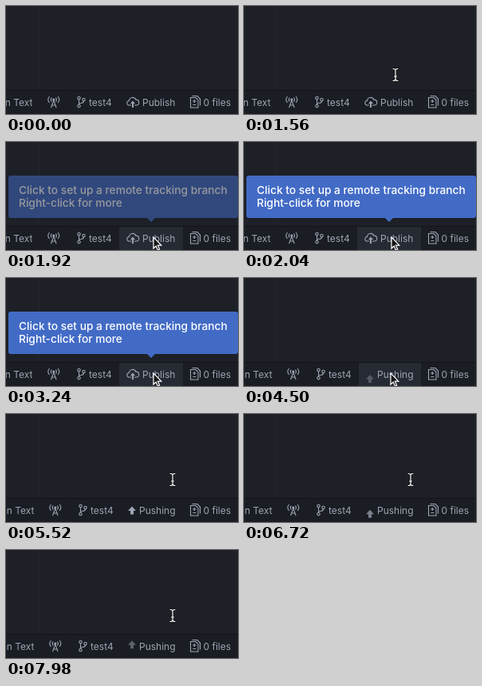
These frames come from a looping animation (291 px wide and 135 px high, 8 s). An HTML page:

```html
<!DOCTYPE html>
<html lang="en">
<head>
<meta charset="utf-8">
<style>
  html, body { margin: 0; height: 100%; overflow: hidden; background: #1d2027; }
  svg { display: block; width: 291px; height: 135px; }
  text { font: 12px Inter, sans-serif; fill: #9da5b4; }
  #tip { fill: #426bc6; }
  #tip text { font-size: 13.75px; font-weight: 500; fill: #fff; }
  .icon { fill: none; stroke: #9da5b4; stroke-width: 1.1; }
  .solid { fill: #9da5b4; stroke: none; }
</style>
</head>
<body>
<svg viewBox="0 0 291 135">
  <rect width="291" height="135" fill="#1d2027"/>
  <rect x="41" width="1" height="105" fill="#21242c"/>
  <rect y="105" width="291" height="30" fill="#1a1d23"/>
  <rect y="105" width="291" height="1" fill="#121418"/>
  <rect id="hover" y="106" height="29" fill="#262a32"/>

  <g id="left">
    <text x="33.5" y="125" text-anchor="end">Plain Text</text>
    <g class="icon">
      <path d="M56.5 127l3.3-9 3.3 9M57.7 124h4.4M57.2 119.500q-2-2.500 0-5M62.4 119.500q2-2.500 0-5M54.6 121q-3.6-4 0-8M65 121q3.6-4 0-8"/>
      <circle class="solid" cx="59.8" cy="117" r="1.6"/>
    </g>
    <g class="icon">
      <circle cx="91.500" cy="115" r="1.7"/>
      <circle cx="91.500" cy="125" r="1.7"/>
      <circle cx="97.500" cy="117" r="1.7"/>
      <path d="M91.500 116.7v6.6M97.500 118.7q0 2.6-3 2.6-3 0-3 2"/>
    </g>
    <text x="104" y="125">test4</text>
  </g>

  <g id="publish">
    <path class="icon" d="M157 124h-2.300a2.800 2.800 0 0 1-.2-5.600a4.300 4.300 0 0 1 8.300-1.200a3.400 3.400 0 0 1 1 6.800h-2.800"/>
    <path class="solid" d="M159 118.500l3 3.500h-2v5h-2v-5h-2z"/>
    <text x="171" y="125">Publish</text>
  </g>
  <g id="pushing">
    <path id="arrow" class="solid" d="M0-5l5 5.500h-3v4.500h-4v-4.500h-3z"/>
    <text x="167" y="125">Pushing</text>
  </g>

  <path class="icon" d="M231.5 114.5h6.5l3 3v9.5h-9.5zM233.5 112.5h6.5l3.5 3.5v8.5M236.3 117v4M234.3 119h4M234.3 123.5h4"/>
  <text x="247.5" y="125">0 files</text>

  <g id="tip">
    <path d="M176.5 94.5h11l-5.5 5.5z"/>
    <rect x="3" y="42" width="288" height="53" rx="3"/>
    <text x="16" y="65">Click to set up a remote tracking branch</text>
    <text x="16" y="81">Right-click for more</text>
  </g>

  <defs>
    <path id="stem" fill="none" stroke-linecap="round" d="M-3-7.5q3 0 3 2v11q0 2-3 2M3-7.5q-3 0-3 2v11q0 2 3 2M-1.5 2h3"/>
  </defs>
  <g id="beam">
    <use href="#stem" stroke="#111" stroke-width="2.6"/>
    <use href="#stem" stroke="#fff" stroke-width="1.2"/>
  </g>
  <path id="pointer" d="M0 0v14l3.2-3 2.2 5 2.2-1-2.2-4.8h4.4z" fill="#111" stroke="#fff" stroke-width="1.2"/>
</svg>
<script>
const LOOP = 8000, PUSH = 4500, TIP = 1840, BAR_TOP = 105;

// Cursor hot spot: [ms, x, y]
const path = [
  [480, 205, -9], [840, 205, 18], [1140, 205, 18], [1560, 190, 86],
  [1760, 185, 119], [4300, 185, 119], [4500, 184, 119],
  [4900, 184, 119], [5380, 209, 82]
];

const el = id => document.getElementById(id);
const clamp = v => Math.max(0, Math.min(1, v));
const show = (id, on) => el(id).style.display = on ? "" : "none";
const move = (id, x, y) => el(id).setAttribute("transform", `translate(${x} ${y})`);

function cursorAt(t) {
  const i = path.findIndex(p => p[0] > t);
  if (i === 0) return path[0].slice(1);
  if (i < 0) return path[path.length - 1].slice(1);
  const [t0, x0, y0] = path[i - 1], [t1, x1, y1] = path[i];
  const k = (t - t0) / (t1 - t0), e = k * k * (3 - 2 * k);
  return [x0 + (x1 - x0) * e, y0 + (y1 - y0) * e];
}

function draw(t) {
  const pushing = t >= PUSH;
  const [x, y] = cursorAt(t);
  const overBar = y > BAR_TOP;

  show("beam", !overBar);
  show("pointer", overBar);
  move("beam", x, y);
  move("pointer", x, y);

  show("hover", overBar);
  el("hover").setAttribute("x", pushing ? 144 : 142);
  el("hover").setAttribute("width", pushing ? 78 : 80);

  move("left", pushing ? 2 : 0, 0);
  show("publish", !pushing);
  show("pushing", pushing);
  show("tip", t >= TIP && !pushing);
  el("tip").style.opacity = clamp((t - TIP) / 150);

  // The arrow drifts upward, fading at both ends
  const p = (t - PUSH + 2100) % 2000 / 2000;
  move("arrow", 158, 126.5 - 10.5 * p);
  el("arrow").style.opacity = clamp(Math.min(.25 + 3 * p, 2.4 * (1 - p)));
}

function frame() {
  draw(performance.now() % LOOP);
  requestAnimationFrame(frame);
}
frame();
</script>
</body>
</html>
```
